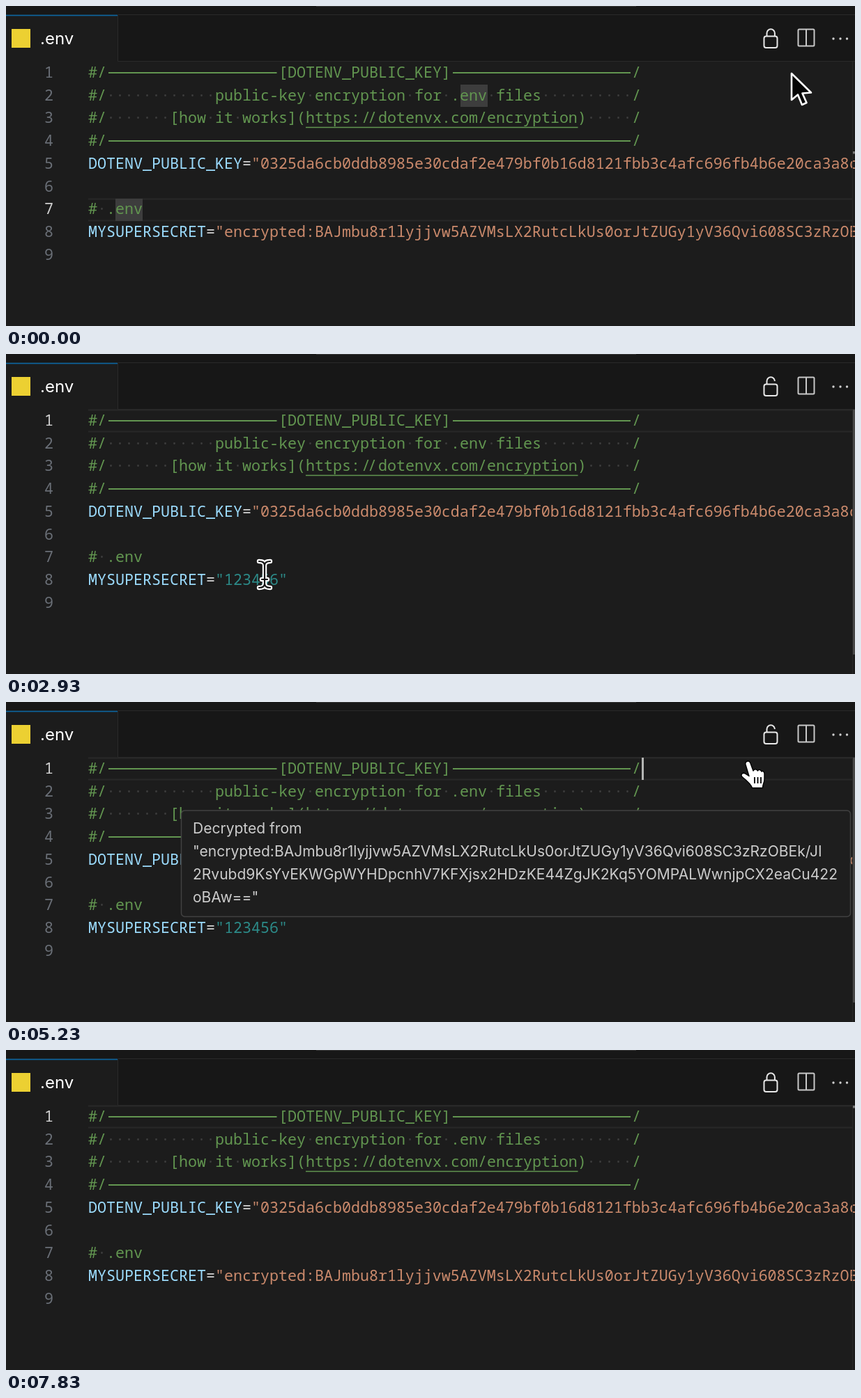
An HTML page that plays this animation: 1218 px wide and 460 px high, repeating every 7.86 s.

```html
<!DOCTYPE html>
<html lang="en">
<head>
<meta charset="utf-8">
<title>Editor lock toggle</title>
<style>
  html, body { margin: 0; width: 100%; height: 100%; overflow: hidden; background: #1c1c1c; }
  svg { display: block; width: 1218px; height: 460px; }
  text { white-space: pre; }
  .code text { font: 21.67px "Noto Sans Mono", monospace; }
  .ui { font-family: Inter, "Liberation Sans", sans-serif; }
  .green { fill: #629650; }
  .blue { fill: #9cdcfe; }
  .plain { fill: #d4d4d4; }
  .orange { fill: #cb8a6c; }
  .teal { fill: #2c8a88; }
  .space { fill: #3d3d3d; }
  .num { fill: #6a6f77; }
  .icon { fill: none; stroke: #e8e8e8; stroke-width: 2; }
</style>
</head>
<body>
<svg viewBox="0 0 1218 460">
  <rect width="1218" height="460" fill="#1c1c1c"/>

  <!-- title strip and tab bar -->
  <rect width="1218" height="12" fill="#171717"/>
  <rect x="445" width="459" height="1" fill="#383838"/>
  <rect x="161" y="12" width="1057" height="68" fill="#171717"/>
  <path d="M161 12.5H1218M160.5 13V79.5H1218" fill="none" stroke="#2a2a2a"/>
  <rect y="12.700" width="160" height="1.600" fill="#0c66a3"/>
  <rect x="8" y="33" width="27" height="27" fill="#ecd032"/>
  <text class="ui" x="49" y="55" font-size="24" fill="#fff">.env</text>

  <rect id="hover" x="1076" y="26" width="42" height="42" rx="8" fill="#2a2b2b"/>
  <rect class="icon" x="1087.500" y="43.500" width="19" height="16.500" rx="3"/>
  <path class="icon" id="shackle"/>
  <path class="icon" style="stroke:#c8c8c8" d="M1138 33.500H1158Q1159.500 33.500 1159.500 35V56Q1159.500 57.500 1158 57.500H1138Q1136.500 57.500 1136.500 56V35Q1136.500 33.500 1138 33.500ZM1148 33.500V57.500"/>
  <g fill="#cfcfcf"><circle cx="1187" cy="47" r="1.7"/><circle cx="1197" cy="47" r="1.7"/><circle cx="1206.5" cy="47" r="1.7"/></g>

  <!-- editor -->
  <g id="row7">
    <path d="M118 277.5H1214M118 308.5H1214" stroke="#282828" stroke-width="2"/>
    <path d="M652 113h39v32h-39zM157 277h39v32h-39z" fill="#3d3d3d"/>
  </g>
  <path id="row1" d="M118 80.5H1214M118 111.5H1214" stroke="#282828" stroke-width="2"/>
  <g class="code" id="code"></g>
  <g class="code" id="locked"></g>
  <g class="code" id="open"></g>
  <path d="M147 96H388.500M641 96H896M147 194H896" stroke="#629650" stroke-width="1.8"/>
  <path d="M430 174.500H820.500" stroke="#629650" stroke-width="1.500"/>
  <rect id="caret" x="912" y="80" width="3" height="32" fill="#b4b5b3"/>

  <path d="M1214.500 80V460" stroke="#272727"/>
  <rect id="mark" x="1215" width="3" height="3.500" fill="#777"/>
  <rect id="slider" x="1215" y="80" width="3" height="352" fill="#484848"/>

  <g id="tip" class="ui" font-size="21.03" fill="#cccccc">
    <rect x="251.5" y="156" width="960" height="152.500" rx="5" fill="#1e1e1e" stroke="#414141" stroke-width="1.5"/>
  </g>

  <!-- pointers -->
  <path id="arrow" d="M0 0V38L9 30.500L15 45L21.500 42L15.500 28.500L28 27.500Z" fill="#050505" stroke="#fff" stroke-width="2.600" stroke-linejoin="round"/>
  <g id="hand" stroke="#000" stroke-width="1.4" stroke-linejoin="round">
    <path d="M-1 4C-2 -1 4 -3 6 2L10 13C11 10 15 10 16.500 13C18 10.500 21 11 22 14C23.500 12.500 26 14 26 17V25C26 30 23.500 32 23.500 37.500H8.500C7.500 33 2 28 -6 21.500C-9 18 -5 15 -1.500 17L4 20.500Z" fill="#fff"/>
    <path d="M12 22V31M16.500 22V31M21 22V31" fill="none" stroke-width="1.800"/>
  </g>
  <g id="beam" fill="none" stroke-linecap="round">
    <path id="beamOuter" stroke="#fff" stroke-width="6.400"/>
    <path id="beamInner" stroke="#111" stroke-width="2.200"/>
  </g>
</svg>
<script>
const LOOP = 7860, LEFT = 118, PITCH = 13, ROW = 32.72, BASE = 102.9;
const el = id => document.getElementById(id);
const esc = s => s.replace(/&/g, "&amp;").replace(/</g, "&lt;");

// Writes one run of text at a row and column of the character grid.
function put(group, row, col, str, cls, id = "") {
  const x = LEFT + PITCH * col, y = BASE + ROW * (row - 1);
  el(group).insertAdjacentHTML("beforeend",
    `<text ${id && `id="${id}"`} class="${cls}" x="${x}" y="${y}">${esc(str)}</text>`);
}
// Comment text whose spaces are shown as faint dots.
function comment(row, str) {
  for (const m of str.matchAll(/ +|[^ ]+/g)) {
    const gap = m[0][0] === " ";
    put("code", row, m.index, gap ? "·".repeat(m[0].length) : m[0], gap ? "space" : "green");
  }
}

for (let n = 1; n <= 9; n++) put("code", n, -63 / PITCH, String(n), "num", "n" + n);

put("code", 1, 0, "#/", "green");
put("code", 1, 21, "[DOTENV_PUBLIC_KEY]", "green");
put("code", 1, 60, "/", "green");
comment(2, "#/" + " ".repeat(12) + "public-key encryption for .env files" + " ".repeat(10) + "/");
comment(3, "#/" + " ".repeat(7) + "[how it works](https:");
put("code", 3, 30.15, "/", "green");
put("code", 3, 30.85, "/", "green");
put("code", 3, 32, "dotenvx.com/encryption)", "green");
put("code", 3, 55, "·····", "space");
put("code", 3, 60, "/", "green");
put("code", 4, 0, "#/", "green");
put("code", 4, 60, "/", "green");
put("code", 5, 0, "DOTENV_PUBLIC_KEY", "blue");
put("code", 5, 17, "=", "plain");
put("code", 5, 18, '"0325da6cb0ddb8985e30cdaf2e479bf0b16d8121fbb3c4afc696fb4b6e20ca3a8c', "orange");
comment(7, "# .env");
put("code", 8, 0, "MYSUPERSECRET", "blue");
put("code", 8, 13, "=", "plain");

const cipher = '"encrypted:BAJmbu8r1lyjjvw5AZVMsLX2RutcLkUs0orJtZUGy1yV36Qvi608SC3zRzOBEk';
put("locked", 8, 14, cipher, "orange");
put("open", 8, 14, '"123456"', "teal");

["Decrypted from", cipher + "/JI",
 "2Rvubd9KsYvEKWGpWYHDpcnhV7KFXjsx2HDzKE44ZgJK2Kq5YOMPALWwnjpCX2eaCu422", 'oBAw=="']
  .forEach((s, i) => el("tip").insertAdjacentHTML("beforeend",
    `<text x="268" y="${188.5 + 33 * i}">${esc(s)}</text>`));

const beam = "M-8 -19Q0 -19 0 -13Q0 -19 8 -19M0 -13V13M-8 19Q0 19 0 13Q0 19 8 19M-4 7H4";
el("beamOuter").setAttribute("d", beam);
el("beamInner").setAttribute("d", beam);

// Pointer path: time, x, y
const path = [
  [0, 1127, 97], [250, 1127, 97], [700, 1110, 62], [970, 1109, 62], [1750, 1108, 60],
  [2650, 371, 312], [2930, 371, 317], [3250, 371, 332], [4250, 371, 332],
  [4780, 1005, 130], [5230, 1062, 86], [5520, 1094, 67], [6450, 1094, 67], [6950, 1100, -60]
];
const ease = u => u * u * (3 - 2 * u);
function pointer(t) {
  const i = path.findIndex(p => p[0] > t);
  if (i < 0) return path[path.length - 1].slice(1);
  const [a, x, y] = path[i - 1], [b, x2, y2] = path[i];
  const u = ease((t - a) / (b - a));
  return [x + (x2 - x) * u, y + (y2 - y) * u];
}

const within = (t, a, b) => t >= a && t < b;
const ramp = (t, a, b) => Math.max(0, Math.min(1, (t - a) / (b - a)));
const show = (id, o) => el(id).setAttribute("opacity", +o);

function render(t) {
  const [x, y] = pointer(t);
  const fresh = t < 760;
  const unlocked = within(t, 1250, 5720);
  const plain = within(t, 1250, 6560);
  const kind = t < 520 || t > 6650 ? "arrow" : within(t, 1950, 5100) ? "beam" : "hand";

  show("row7", fresh);
  show("row1", !fresh);
  el("n1").style.fill = fresh ? "" : "#d0d0d0";
  el("n7").style.fill = fresh ? "#d0d0d0" : "";
  el("mark").setAttribute("y", fresh ? 209 : 80);

  show("locked", !plain);
  show("open", plain);
  el("shackle").setAttribute("d", "M1091.5 43.5V39a5.700 5.700 0 0 1 11.400 0" + (unlocked ? "" : "V43.5"));
  show("hover", within(t, 600, 1930) || within(t, 5430, 6620));

  show("caret", !fresh && within(t % 1000, 150, 650));
  show("slider", t < 2250
    ? ramp(t, 330, 430) * (1 - ramp(t, 1600, 2200))
    : ramp(t, 2250, 2350) * (t < 5720));
  show("tip", within(t, 3500, 5720) ? ramp(t, 3500, 3600) : 0);

  for (const id of ["arrow", "hand", "beam"]) {
    show(id, id === kind);
    el(id).setAttribute("transform", `translate(${x.toFixed(2)} ${y.toFixed(2)})`);
  }
}

const start = performance.now();
function tick(now) {
  render(Math.max(0, now - start) % LOOP);
  requestAnimationFrame(tick);
}
render(0);
requestAnimationFrame(tick);
</script>
</body>
</html>
```
